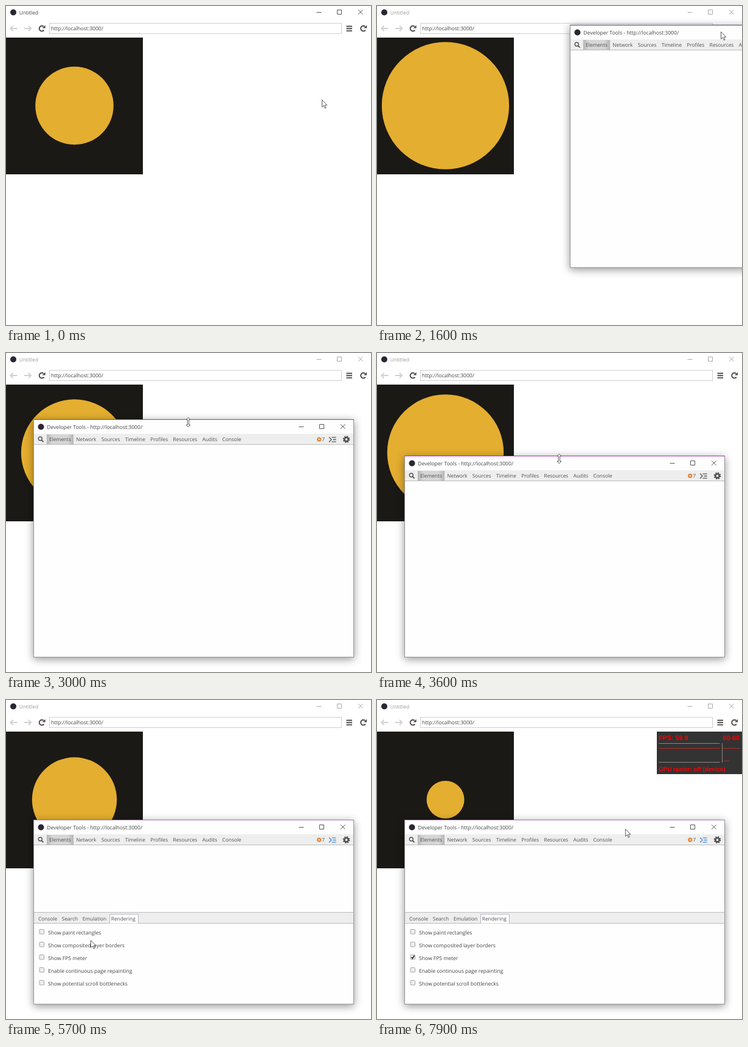
Write an HTML page that moves like this. It is 600x525 px and loops after 8000 ms.

```html
<!DOCTYPE html>
<html lang="en">
<head>
<meta charset="utf-8">
<title>Developer tools demo</title>
<style>
html, body { margin: 0; width: 100%; height: 100%; overflow: hidden; background: #fff; }
svg { display: block; width: 600px; height: 525px; color: #444; }
text { font: 8.55px "Open Sans", "Noto Sans", sans-serif; fill: #444; text-rendering: geometricPrecision; }
.tab { font-size: 8.35px; fill: #505050; }
.frame { fill: #fefefe; stroke: #969298; filter: drop-shadow(0 3px 7px rgba(0, 0, 0, .42)); }
.blurred { color: #a0a0a0; }
.blurred text { fill: #999; }
.meter text { font: bold 10.8px "Liberation Sans", Arial, sans-serif; fill: #f00; }
.meter .small { font-size: 9.8px; }
</style>
</head>
<body>
<svg viewBox="0 0 600 525">
  <defs>
    <path id="buttons" d="M0 4H8M34 0h7v7h-7zM68.5-.2l7.6 7.6m0-7.6l-7.6 7.6" fill="none" stroke="currentColor" stroke-width=".9"/>
    <g id="reload">
      <path d="M3.4 2.6A4.3 4.3 0 1 1 2.8-3.2" fill="none" stroke="#4f4949" stroke-width="1.9"/>
      <path d="M5.6-5.4V-.4H.6z" fill="#4f4949"/>
    </g>
    <path id="back" d="M6 0H-5M-1-4.3L-5.2 0L-1 4.3" fill="none" stroke="#d0d0d0" stroke-width="1.8"/>
    <linearGradient id="pressed">
      <stop offset="0" stop-color="#b4b4b4"/><stop offset=".2" stop-color="#d6d6d6"/>
      <stop offset=".8" stop-color="#d6d6d6"/><stop offset="1" stop-color="#b4b4b4"/>
    </linearGradient>
  </defs>

  <rect width="600" height="525" fill="#fff"/>
  <g id="titlebar">
    <text x="21.8" y="14" style="font-size:8.4px">Untitled</text>
    <use href="#buttons" x="510.5" y="6.5"/>
  </g>
  <circle cx="12" cy="10.5" r="5" fill="#2c2633"/>
  <use href="#back" x="12.5" y="37"/>
  <use href="#back" transform="translate(36 37) scale(-1 1)"/>
  <use href="#reload" x="59" y="37"/>
  <rect x="71.5" y="28.5" width="480" height="17" fill="#fff" stroke="#d0d0d0"/>
  <text x="74" y="40">http://localhost:3000/</text>
  <path d="M559.5 33.5h9.5m-9.5 3.7h9.5m-9.5 3.7h9.5" stroke="#4f4949" stroke-width="1.9"/>
  <use href="#reload" x="587.5" y="37"/>

  <rect y="52" width="225" height="225" fill="#1b1916"/>
  <circle id="ball" cx="112.5" cy="164" fill="#e4ae30"/>

  <g id="meter" class="meter">
    <rect x="460" y="52" width="140" height="70" fill="#333"/>
    <path d="M463 71.5H563.5M463 102.5H563.5M567.5 71V103" stroke="#8f8888"/>
    <path d="M463 79.5H563.5M568 79.5H597M568 100.5H580" stroke="#b8281c"/>
    <text x="463" y="66">FPS: 59.9</text>
    <text x="568.5" y="66">60-60</text>
    <text class="small" x="463" y="116.5">GPU raster: off (device)</text>
  </g>

  <g id="tools">
    <rect id="frame" class="frame" x=".5" y="-.5" width="526"/>
    <path id="accent" d="M0-.5H527"/>
    <circle cx="12.5" cy="11.5" r="5" fill="#2c2633"/>
    <text x="22.3" y="14.6">Developer Tools - http://localhost:3000/</text>
    <use href="#buttons" x="436.5" y="7.5"/>
    <rect x="1" y="23" width="525" height="17" fill="#eee"/>
    <path d="M1 40.5H526" stroke="#bcbcbc"/>
    <rect x="22" y="24" width="44" height="16" fill="url(#pressed)"/>
    <g fill="none" stroke="#505050">
      <circle cx="11.3" cy="31" r="3" stroke-width="1.4"/>
      <path d="M13.5 33.3l3 3" stroke-width="1.8"/>
      <circle cx="514.5" cy="32.2" r="3.2" stroke-width="2.6"/>
      <circle cx="514.5" cy="32.2" r="5" stroke-width="1.8" stroke-dasharray="2.1 1.827"/>
    </g>
    <text id="tabs" class="tab" x="26" y="35"/>
    <circle id="badge" cx="469.7" cy="32.2" r="3.6"/>
    <path d="M468.3 30.8l2.8 2.8m0-2.8l-2.8 2.8" stroke="#fff"/>
    <text class="tab" x="474.3" y="35.2">7</text>
    <path id="prompt" d="M486 28.5l4 4l-4 4M490.5 28.8h7M492.5 32.5h5M490.5 36.2h7" fill="none" stroke-width="1.3"/>
  </g>

  <g id="drawer">
    <rect x="46" y="350" width="525" height="17" fill="#eee"/>
    <path d="M46 349.5H571M46 367.5H571" stroke="#bcbcbc"/>
    <path d="M170.5 367.5V352.5H217.5V367.5" fill="#fff" stroke="#b6b4c2"/>
    <text id="drawerTabs" class="tab" x="53" y="362.7"/>
    <path id="tick" d="M56.6 423.2l1.8 2.1l3-4.8" fill="none" stroke="#222" stroke-width="1.6"/>
  </g>
  <g id="cursor" fill="#fff" stroke="#333" stroke-width=".8">
    <path id="arrow" d="M.5.5V12.3L3.2 9.8L5.3 14.3L7.1 13.5L5.1 9.1H8.8z"/>
    <path id="resize" d="M0-8L3.4-4.2H1.2V4.2H3.4L0 8L-3.4 4.2H-1.2V-4.2H-3.4z"/>
  </g>
</svg>
<script>
const $ = id => document.getElementById(id);
const LOOP = 8000, STEP = 100;
const OPEN = 1300, GRAB = 2800, RELEASE = 4000, DRAWER = 4600, CHECK = 6400;
const BOTTOM = 500, HEIGHT = 398;

function add(parent, tag, attrs, text = '') {
  const el = document.createElementNS('http://www.w3.org/2000/svg', tag);
  for (const key in attrs) el.setAttribute(key, attrs[key]);
  el.textContent = text;
  return parent.appendChild(el);
}

// Each tab follows the measured end of the one before it.
function addTabs(parent, names, gap) {
  names.split(' ').forEach((name, i) => add(parent, 'tspan', { dx: i ? gap : 0 }, name));
}
addTabs($('tabs'), 'Elements Network Sources Timeline Profiles Resources Audits Console', 8.3);
addTabs($('drawerTabs'), 'Console Search Emulation Rendering', 7.6);

['Show paint rectangles', 'Show composited layer borders', 'Show FPS meter',
 'Enable continuous page repainting', 'Show potential scroll bottlenecks'].forEach((label, i) => {
  const y = 377.5 + 21 * i;
  add($('drawer'), 'rect', { x: 55, y, width: 7.5, height: 7.5, rx: 1, fill: '#eee', stroke: '#a4a4a4' });
  add($('drawer'), 'text', { x: 69, y: y + 8.8 }, label);
});
$('drawer').append($('tick'));

const progress = (t, from, to) => Math.min(1, Math.max(0, (t - from) / (to - from)));
const mix = (a, b, k) => a + (b - a) * k;

const radius = t => 112.5 * (0.59 + 0.41 * Math.cos(2 * Math.PI * (t - 1420) / 1912));

// The window is dragged along a slowing arc, then its top edge is pulled down.
function panelAt(t) {
  const drag = 1 - (1 - progress(t, 1800, 2585)) ** 2;
  const pull = progress(t, 2920, 3880);
  return {
    x: Math.round(mix(317, 45, drag)),
    y: Math.round(mix(32, 102, drag) + 35 * Math.sin(Math.PI * drag) + 96 * pull),
  };
}

// Each leg is [start, end, x, y].
const approach = [[200, 800, 565, 37], [1200, 1500, 565, 42]];
const tour = [[4000, 4500, 538, 231], [4700, 5900, 59, 428], [6500, 6800, 214, 357], [6800, 7600, 408, 212]];

function follow(t, x, y, legs) {
  for (const [from, to, toX, toY] of legs) {
    const k = progress(t, from, to);
    x = mix(x, toX, k);
    y = mix(y, toY, k);
  }
  return [x, y];
}

function pointerAt(t, panel) {
  if (t < 1800) return follow(t, 519, 154, approach);
  const k = progress(t, 2600, GRAB);
  return follow(t, panel.x + mix(248, 254.5, k), panel.y + mix(10, 4, k), tour);
}

const show = (el, on) => el.setAttribute('visibility', on ? 'visible' : 'hidden');
const move = (el, x, y) => el.setAttribute('transform', `translate(${x} ${y})`);

function draw(t) {
  const panel = panelAt(t), opened = t >= OPEN;
  const grabbed = t >= GRAB, resizing = grabbed && t < RELEASE;

  $('ball').setAttribute('r', radius(t));
  $('titlebar').setAttribute('class', opened ? 'blurred' : '');
  show($('tools'), opened);
  move($('tools'), panel.x, panel.y);
  $('frame').setAttribute('height', 1 + (grabbed ? BOTTOM - panel.y : HEIGHT));
  $('accent').setAttribute('stroke', resizing ? '#b02cba' : grabbed ? '#a27bad' : '#46506f');
  $('badge').setAttribute('fill', grabbed ? '#e08436' : '#b5303c');
  $('prompt').setAttribute('stroke', t < DRAWER ? '#505050' : '#4a86d8');

  show($('drawer'), t >= DRAWER);
  show($('tick'), t >= CHECK);
  show($('meter'), t >= CHECK);

  show($('arrow'), !resizing);
  show($('resize'), resizing);
  move($('cursor'), ...pointerAt(t, panel));
}

const start = performance.now();
function loop() {
  const t = (performance.now() - start) % LOOP;
  draw(Math.floor(t / STEP) * STEP);
  requestAnimationFrame(loop);
}
loop();
</script>
</body>
</html>
```
